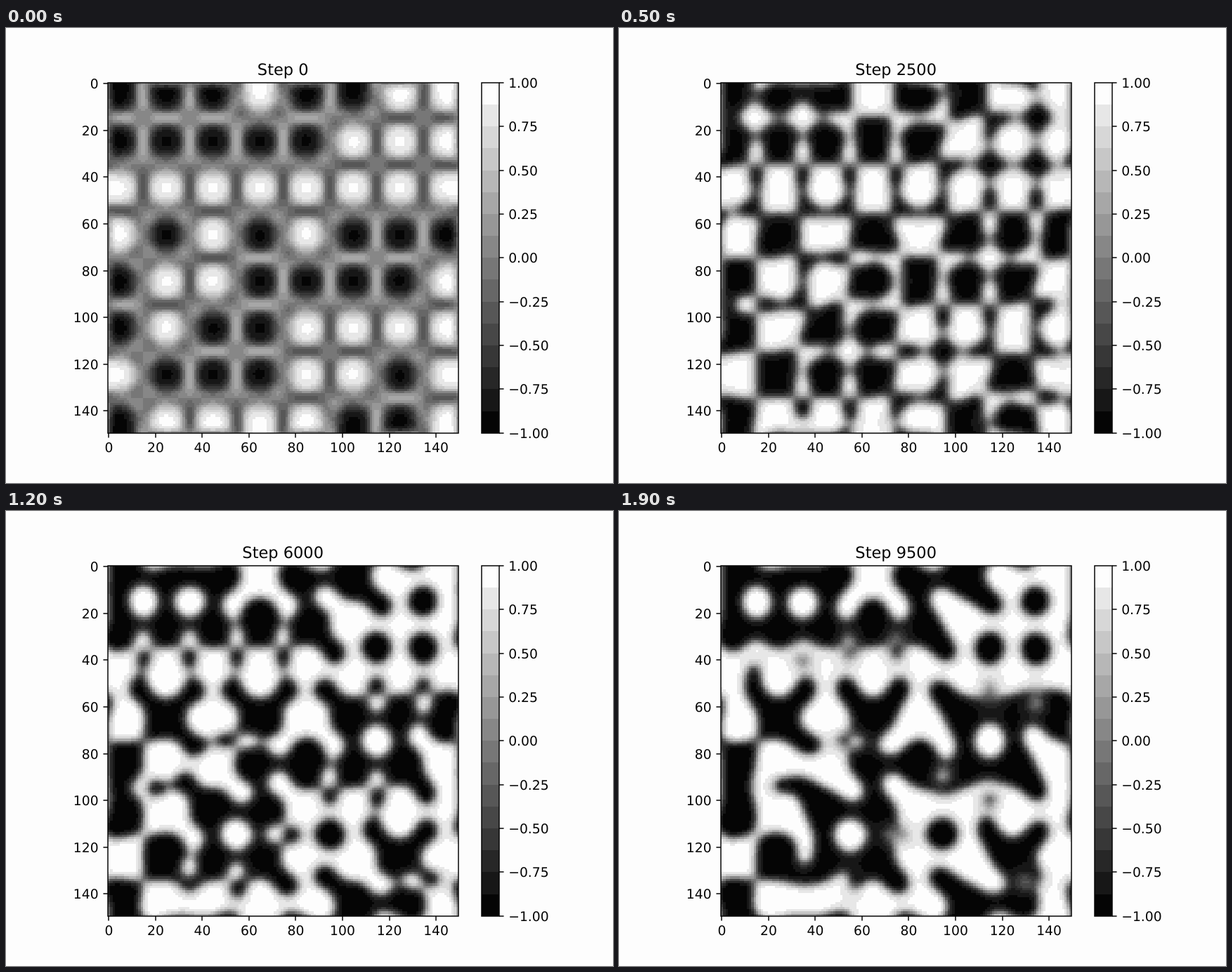
An HTML page with a canvas for the animation above (2000 ms loop, 864x648 px).

```html
<!DOCTYPE html>
<html lang="en">
<head>
<meta charset="utf-8">
<title>Phase separation</title>
<style>
  html, body { margin: 0; width: 100%; height: 100%; overflow: hidden; background: #fdfdfd; }
  #stage { position: absolute; left: 0; top: 0; width: 864px; height: 648px; overflow: hidden; }
  canvas { position: absolute; left: 145px; top: 78px; width: 499px; height: 499px; image-rendering: pixelated; }
  svg { position: absolute; left: 0; top: 0; }
  text { font: 18.75px "DejaVu Sans", sans-serif; fill: #050505; text-rendering: geometricPrecision; }
  #title { font-size: 22.5px; }
  .line { fill: none; stroke: #050505; stroke-width: 1.5; }
</style>
</head>
<body>
<div id="stage">
  <canvas id="field" width="150" height="150"></canvas>
  <svg id="plot" width="864" height="648" viewBox="0 0 864 648">
    <text id="title" x="394.2" y="67" text-anchor="middle">Step 0</text>
  </svg>
</div>
<script>
const SIZE = 150, FRAMES = 20, FRAME_MS = 100, STEPS_PER_FRAME = 500;
const LEFT = 144.72, TOP = 77.76, SIDE = 498.96;
const plot = document.getElementById('plot');
const title = document.getElementById('title');
const ctx = document.getElementById('field').getContext('2d');

// Sixteen gray bands from -1 to 1
const grays = Array.from({ length: 16 }, (_, k) => k === 0 ? 5 : k === 15 ? 253 : 16 * k + 7);
const band = v => Math.max(0, Math.min(15, Math.floor((v + 1) * 8)));

function add(name, attrs, label) {
  const el = document.createElementNS('http://www.w3.org/2000/svg', name);
  for (const key in attrs) el.setAttribute(key, attrs[key]);
  if (label !== undefined) el.textContent = label;
  plot.appendChild(el);
}
const line = d => add('path', { d, class: 'line' });
const write = (x, y, anchor, label) => add('text', { x, y: Math.round(y), 'text-anchor': anchor }, label);

function drawAxes() {
  for (let v = 0; v < SIZE; v += 20) {
    const offset = (v + 0.5) * SIDE / SIZE;
    const x = LEFT + offset, y = TOP + offset;
    line(`M${Math.round(x)} 577v6.56`);
    line(`M145 ${Math.round(y)}h-6.56`);
    write(x, 604.1, 'middle', v);
    write(131.6, y + 7, 'end', v);
  }
  line('M145 78H644V577H145Z');
}

function drawColorbar() {
  grays.forEach((g, k) => {
    const top = Math.round(TOP + (15 - k) * SIDE / 16);
    const bottom = Math.round(TOP + (16 - k) * SIDE / 16);
    add('rect', { x: 677, y: top, width: 25, height: bottom - top, fill: `rgb(${g},${g},${g})` });
  });
  for (let i = 0; i <= 8; i++) {
    const v = 1 - i / 4, y = TOP + i * SIDE / 8;
    line(`M702 ${Math.round(y)}h6.56`);
    write(715.2, y + 7, 'start', v.toFixed(2).replace('-', '\u2212'));
  }
  line('M677 78H702V577H677Z');
}

// Starting blocks: + is 1, - is -1, with empty gaps between them
const blocks = [
  '---+--++',
  '-----+++',
  '++++++++',
  '+-+-+---',
  '-++----+',
  '-+--++++',
  '+---++-+',
  '-++++--+'
];

function startField() {
  const u = new Float64Array(SIZE * SIZE);
  for (let y = 0; y < SIZE; y++) {
    for (let x = 0; x < SIZE; x++) {
      if (x % 20 < 10 && y % 20 < 10) {
        u[y * SIZE + x] = blocks[Math.floor(y / 20)][Math.floor(x / 20)] === '+' ? 1 : -1;
      }
    }
  }
  return u;
}

// Five-point Laplacian with wrapped edges
function laplacian(a, out) {
  const last = SIZE - 1;
  for (let y = 0; y < SIZE; y++) {
    const row = y * SIZE;
    const up = (y === 0 ? last : y - 1) * SIZE;
    const down = (y === last ? 0 : y + 1) * SIZE;
    for (let x = 1; x < last; x++) {
      const i = row + x;
      out[i] = a[i - 1] + a[i + 1] + a[up + x] + a[down + x] - 4 * a[i];
    }
    out[row] = a[row + last] + a[row + 1] + a[up] + a[down] - 4 * a[row];
    out[row + last] = a[row + last - 1] + a[row] + a[up + last] + a[down + last] - 4 * a[row + last];
  }
}

// Cahn-Hilliard equation: u' = lap(u^3 - u - KAPPA lap u)
const KAPPA = 2, DT = 0.0125, FRAME_TIME = 5;

function simulate() {
  const u = startField();
  const lap = new Float64Array(u.length), mu = new Float64Array(u.length);
  const substeps = Math.round(FRAME_TIME / DT);
  return Array.from({ length: FRAMES }, () => {
    for (let s = 0; s < substeps; s++) {
      laplacian(u, lap);
      for (let i = 0; i < u.length; i++) mu[i] = u[i] * (u[i] * u[i] - 1) - KAPPA * lap[i];
      laplacian(mu, lap);
      for (let i = 0; i < u.length; i++) u[i] += DT * lap[i];
    }
    return paint(u);
  });
}

function paint(u) {
  const image = ctx.createImageData(SIZE, SIZE);
  for (let i = 0; i < u.length; i++) {
    image.data.fill(grays[band(u[i])], 4 * i, 4 * i + 3);
    image.data[4 * i + 3] = 255;
  }
  return image;
}

drawAxes();
drawColorbar();
const images = simulate();
const start = performance.now();
let shown = -1;

function tick() {
  const elapsed = Math.max(0, performance.now() - start);
  const index = Math.floor(elapsed / FRAME_MS) % FRAMES;
  if (index !== shown) {
    shown = index;
    ctx.putImageData(images[index], 0, 0);
    title.textContent = `Step ${index * STEPS_PER_FRAME}`;
  }
  requestAnimationFrame(tick);
}
tick();
</script>
</body>
</html>
```
